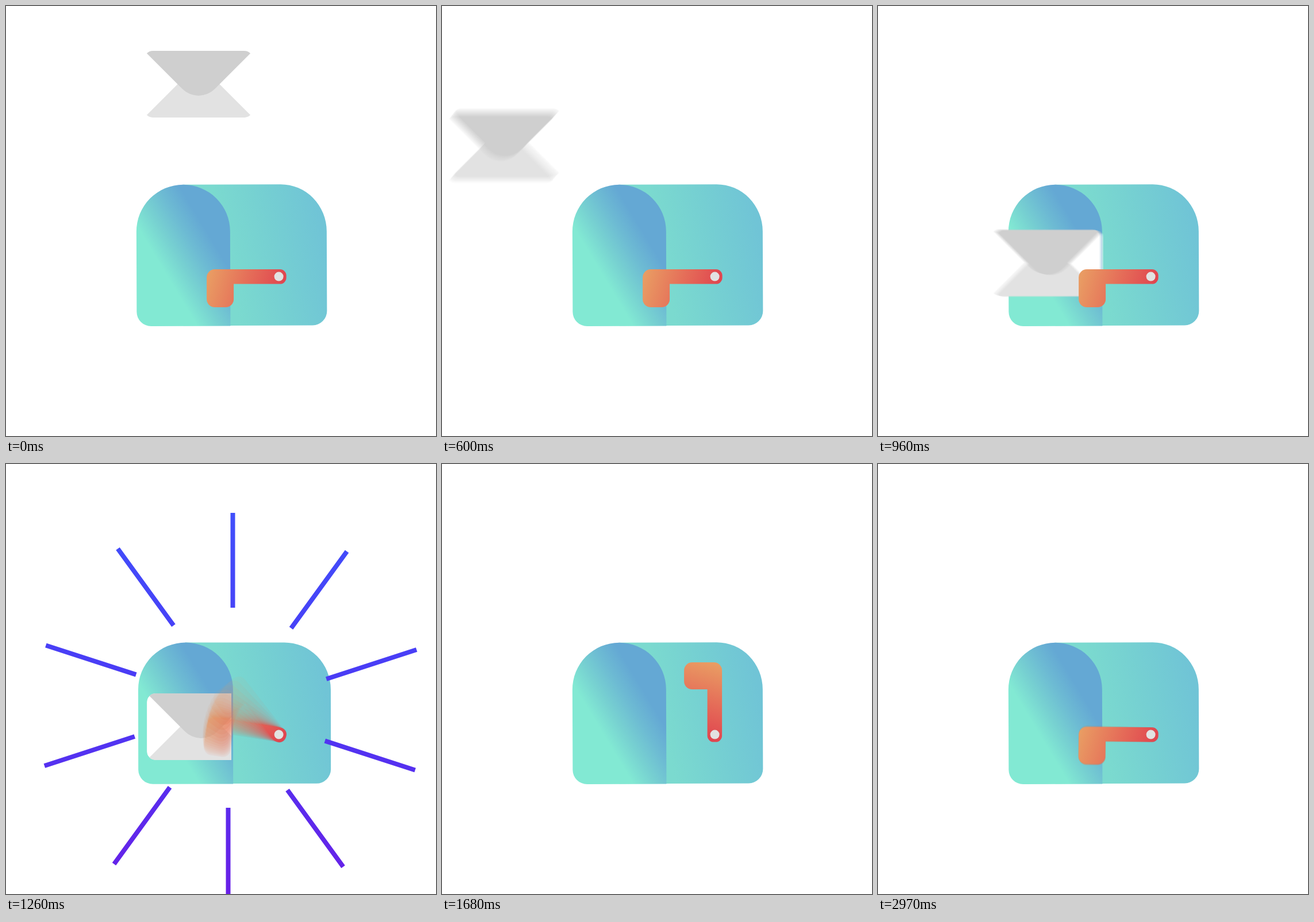
An HTML page with a canvas that plays this animation: 748 by 748 pixels, repeating every 3000 ms.

```html
<!DOCTYPE html>
<html lang="en">
<head>
<meta charset="utf-8">
<title>Mailbox</title>
<style>
  html, body { margin: 0; width: 100%; height: 100%; overflow: hidden; background: #fff; }
  canvas { display: block; width: 748px; height: 748px; }
</style>
</head>
<body>
<canvas id="stage" width="748" height="748"></canvas>
<script>
const SIZE = 748, LOOP = 3000, SAMPLES = 16;
const LETTER_SHUTTER = 16, FLAG_SHUTTER = 36;

const screen = document.getElementById('stage').getContext('2d');
const scratch = document.createElement('canvas');
scratch.width = scratch.height = SIZE;
const c = scratch.getContext('2d');

const clamp = u => Math.max(0, Math.min(1, u));
const smooth = u => u * u * (3 - 2 * u);
const span = (t, from, to) => clamp((t - from) / (to - from));

// Steep ease in and out: cubic-bezier(.8, 0, .2, 1)
function steep(u) {
  let lo = 0, hi = 1;
  for (let i = 0; i < 20; i++) {
    const s = (lo + hi) / 2, r = 1 - s;
    if (2.4 * r * r * s + 0.6 * r * s * s + s * s * s < u) lo = s; else hi = s;
  }
  return smooth(lo);
}

function gradient(x0, y0, x1, y1, ...stops) {
  const g = c.createLinearGradient(x0, y0, x1, y1);
  stops.forEach((color, i) => g.addColorStop(i / (stops.length - 1), color));
  return g;
}

function fill(shape, paint) {
  c.fillStyle = paint;
  c.fill(shape);
}

// Mailbox
const bodyShape = new Path2D('M308 310.5H478A80 82 0 0 1 558 392.5V531A25 25 0 0 1 533 556H308Z');
const frontShape = new Path2D('M227 392A81.5 81.5 0 0 1 390 392V556.5H252A25 25 0 0 1 227 531.5Z');
const bodyPaint = gradient(385, 450, 556, 416, '#7bdacf', '#75cfd2', '#70c4d6');
const frontPaint = gradient(272, 456, 357, 405, '#82e9d3', '#77d1d1', '#6dbbd3', '#64a8d4');

function drawBox(t) {
  const push = smooth(span(t, 1100, 1260)) * (1 - smooth(span(t, 1260, 1500)));
  c.save();
  c.transform(1 + 0.012 * push, 0, 0, 1, 0.3 * push, 0);
  c.translate(392.5, 433.5);
  c.rotate(-0.0035 * (1 - 0.6 * push));
  c.translate(-392.5, -433.5);
  fill(bodyShape, bodyPaint);
  fill(frontShape, frontPaint);
  c.restore();
}

// Letter path: time, x, y and velocity in px per ms
const route = [
  [40, 240.5, 78, 0, 0],
  [420, 174, 94, -0.52, 0.125],
  [540, 68, 137.5, -0.95, 0.62],
  [630, -4, 214, -0.4, 1.05],
  [720, 12.5, 299, 0.6, 0.6],
  [1080, 245, 399, 0, 0],
  [1260, 245, 399, 0, 0],
  [1620, 380, 399, 0.3, 0],
  [1680, 397, 399, 0.2, 0]
];

function letterAt(t) {
  let i = 0;
  while (i < route.length - 2 && t > route[i + 1][0]) i++;
  const a = route[i], b = route[i + 1], d = b[0] - a[0];
  const u = span(t, a[0], b[0]), r = 1 - u;
  const mix = k => a[k] + (b[k] - a[k]) * smooth(u)
    + d * (a[k + 2] * u * r * r - b[k + 2] * u * u * r);
  return [mix(1), mix(2)];
}

const paper = new Path2D();
paper.roundRect(0, 0, 189, 116, 15);
const pocket = new Path2D('M0 116L94.5 21.5L189 116Z');
const lid = new Path2D('M0 0L66 66A40 40 0 0 0 123 66L189 0Z');

function drawLetter(t) {
  c.save();
  if (t > 720) {
    c.beginPath();
    c.rect(0, 0, 392, SIZE);
    c.clip();
  }
  c.translate(...letterAt(t));
  c.clip(paper);
  fill(paper, '#fff');
  fill(pocket, '#e2e2e2');
  fill(lid, '#cfcfcf');
  c.restore();
}

// Flag, drawn around its pivot
const flagShape = new Path2D(
  'M-111.5-12.5H2a11 11 0 0 1 11 11V2a11 11 0 0 1-11 11H-78.5V39.5' +
  'a14 14 0 0 1-14 14h-19a14 14 0 0 1-14-14V1.5a14 14 0 0 1 14-14Z');
const flagPaint = gradient(-120, -10, 5, 25, '#e99c63', '#e56f59', '#e0454f');
const pin = new Path2D();
pin.arc(0, 0, 8, 0, 7);

function drawFlag(t) {
  const raised = steep(span(t, 1185, 1365)) - steep(span(t, 2730, 3000));
  c.save();
  c.translate(474.6, 470.6);
  c.rotate(raised * Math.PI / 2);
  fill(flagShape, flagPaint);
  fill(pin, '#e2e2e2');
  c.restore();
}

// Burst of ten rays
const rayPaint = gradient(0, 85, 0, 762, '#404ffb', '#4c38f4', '#6a1ee6');

function drawRays(t) {
  const reach = u => 174 + 165 * u;
  const outer = reach(1 - (1 - span(t, 1110, 1230)) ** 2);
  const inner = reach(smooth(span(t, 1270, 1440)));
  if (outer <= inner) return;
  const rays = new Path2D(), bar = new Path2D();
  bar.rect(0, -outer, 8, outer - inner);
  for (let i = 0; i < 10; i++) {
    rays.addPath(bar, new DOMMatrix().translate(390.5, 424).rotate(36 * i));
  }
  fill(rays, rayPaint);
}

function drawScene(t, offset) {
  c.fillStyle = '#fff';
  c.fillRect(0, 0, SIZE, SIZE);
  drawBox(t);
  if (t < 1680) drawLetter(t + offset * LETTER_SHUTTER);
  drawFlag(t + offset * FLAG_SHUTTER);
  drawRays(t);
}

// Motion blur: average several moments around t
function frame() {
  const t = performance.now() % LOOP;
  const still = t < 30 || (t > 1680 && t < 2710);
  const n = still ? 1 : SAMPLES;
  for (let i = 0; i < n; i++) {
    drawScene(t, (i + 0.5) / n - 0.5);
    screen.globalAlpha = 1 / (i + 1);
    screen.drawImage(scratch, 0, 0);
  }
  requestAnimationFrame(frame);
}
frame();
</script>
</body>
</html>
```
